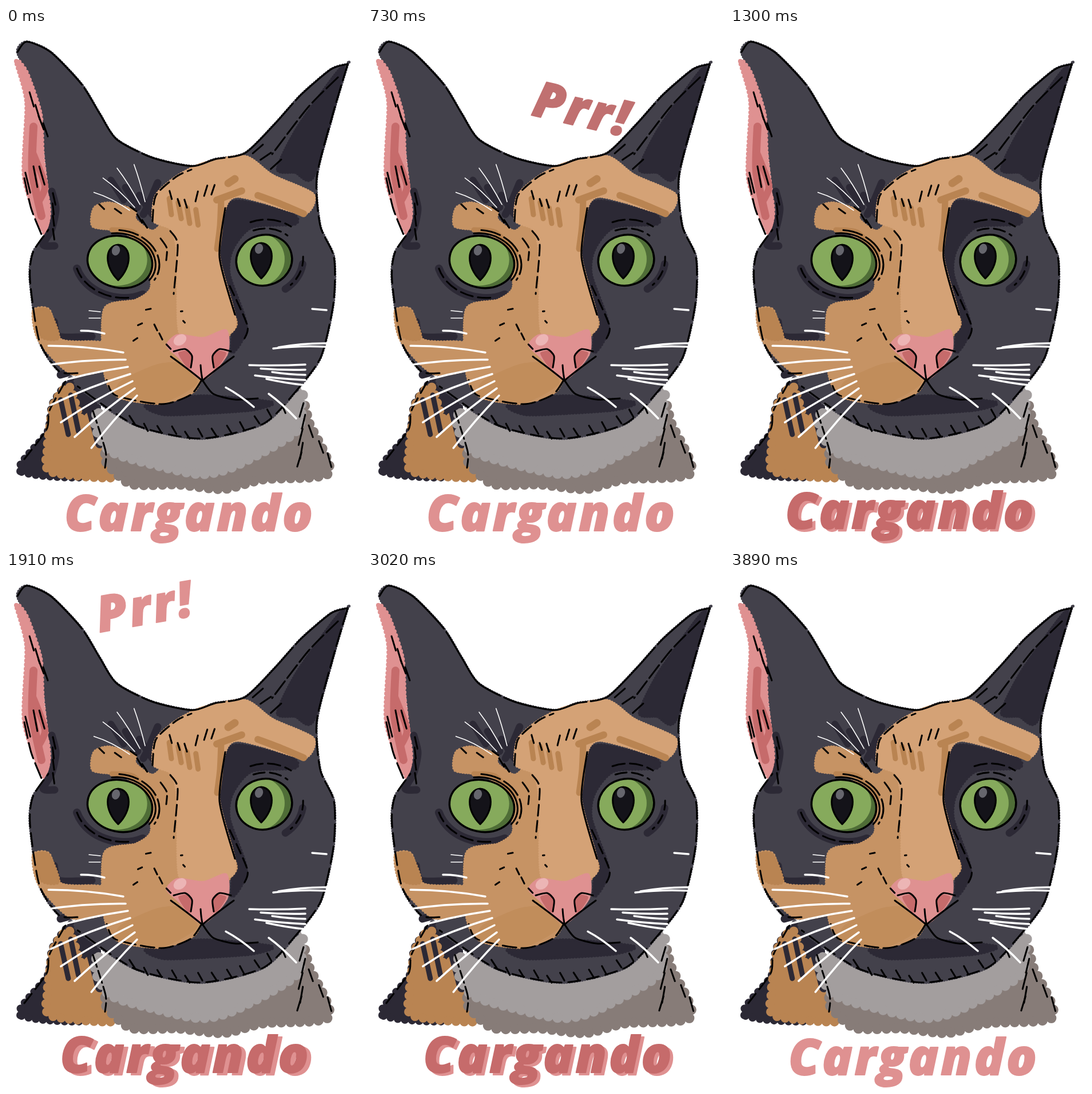
These frames come from a looping animation (622 by 900 pixels, 4120 ms). An HTML page with a canvas:

```html
<!DOCTYPE html>
<html lang="es">
<head>
<meta charset="utf-8">
<title>Cargando</title>
<style>
html, body { margin: 0; width: 100%; height: 100%; overflow: hidden; background: #fff; }
canvas { display: block; width: 622px; height: 900px; }
</style>
</head>
<body>
<canvas id="stage" width="622" height="900"></canvas>
<script>
const W = 622, H = 900, LOOP = 4120;
const FUR = '#43414b', NAVY = '#2c2935', INK = '#000', WHITE = '#fff';
const TAN = '#d4a276', AMBER = '#c69364', BROWN = '#b98452';
const PINK = '#df9191', ROSE = '#c66b6b', DUSK = '#c07070';
const GREY = '#a39e9e', TAUPE = '#877c78';

// Key points of the head, shared by its fill and its ink
const CROWN = '20,42 36,24 78,42 132,98 164,150 193,194 255,226 325,241 365,229 418,218 470,167 516,116 568,72 597,63';
const SIDE = '597,63 571,150 543,260 549,345 573,400 572,480 550,574 508,632';
const CHIN = '508,632 450,690 340,716 225,692 125,625';
const CHEEK = '125,602 92,598 58,545 42,440 47,392 74,352';

const stage = document.getElementById('stage').getContext('2d');
const art = document.createElement('canvas');
art.width = W;
art.height = H;
const g = art.getContext('2d');
g.lineCap = g.lineJoin = 'round';

let seed = 7;
function jitter(size) {
  seed = seed * 16807 % 2147483647;
  return (seed / 2147483647 - 0.5) * size;
}

// Smooth curve through the points of "x,y x,y ..."
function curve(text, closed) {
  const p = text.split(' ').map(s => s.split(',').map(Number));
  const n = p.length;
  const at = i => closed ? p[(i + n) % n] : p[Math.max(0, Math.min(n - 1, i))];
  const path = new Path2D();
  path.moveTo(...p[0]);
  for (let i = 0; i < (closed ? n : n - 1); i++) {
    const [a, b, c, d] = [at(i - 1), at(i), at(i + 1), at(i + 2)];
    path.bezierCurveTo(
      b[0] + (c[0] - a[0]) / 8, b[1] + (c[1] - a[1]) / 8,
      c[0] - (d[0] - b[0]) / 8, c[1] - (d[1] - b[1]) / 8, c[0], c[1]);
  }
  return path;
}

function trace(color, width, path, dash = []) {
  g.strokeStyle = color;
  g.lineWidth = width;
  g.setLineDash(dash);
  g.stroke(path);
  g.setLineDash([]);
}

const line = (color, width, text, dash) => trace(color, width, curve(text), dash);

// Filled curve; fuzz is the size of the brush dabs around its edge
function shape(color, text, fuzz = 0) {
  const path = curve(text, true);
  g.fillStyle = color;
  g.fill(path);
  if (fuzz) trace(color, fuzz, path, [0, fuzz * 0.9]);
}

function oval(color, x, y, rx, ry, turn = 0) {
  g.fillStyle = color;
  g.beginPath();
  g.ellipse(x, y, rx, ry, turn, 0, 7);
  g.fill();
}

// Row of n short strokes, spread from one point to another
function hairs(n, x0, y0, x1, y1, dx, dy, color = INK, width = 3) {
  for (let i = 0; i < n; i++) {
    const k = n > 1 ? i / (n - 1) : 0;
    const x = x0 + (x1 - x0) * k + jitter(5), y = y0 + (y1 - y0) * k + jitter(8);
    const path = new Path2D();
    path.moveTo(x, y);
    path.lineTo(x + dx + jitter(3), y + dy + jitter(5));
    trace(color, width, path);
  }
}

function whisker(x0, y0, x1, y1, bend = 0, width = 3.5) {
  const path = new Path2D();
  path.moveTo(x0, y0);
  path.quadraticCurveTo((x0 + x1) / 2, (y0 + y1) / 2 + bend, x1, y1);
  trace(WHITE, width, path);
}

// Arc around an eye, from angle a to b in degrees
function ring(color, width, eye, scale, a, b, dash) {
  const path = new Path2D(), rad = Math.PI / 180;
  path.ellipse(eye.x, eye.y, eye.rx * scale, eye.ry * scale, eye.turn, a * rad, b * rad);
  trace(color, width, path, dash);
}

const leftEye = { x: 199, y: 408, rx: 57, ry: 45, turn: 0.2, shade: -9, drop: -7, pupil: -3 };
const rightEye = { x: 451, y: 405, rx: 49, ry: 44, turn: -0.25, shade: -13, drop: -1, pupil: -5 };

function drawEye(eye) {
  const { x, y, rx, ry, turn } = eye;
  oval('#4f6d37', x, y, rx, ry, turn);
  g.save();
  g.clip();
  oval('#86aa5c', x + eye.shade, y + eye.drop, rx, ry + 3, turn);
  g.restore();
  ring(INK, 3.5, eye, 1, 0, 360);
  const px = x + eye.pupil;
  const pupil = new Path2D();
  pupil.moveTo(px, y - 30);
  pupil.bezierCurveTo(px + 24, y - 28, px + 25, y + 8, px, y + 32);
  pupil.bezierCurveTo(px - 25, y + 8, px - 24, y - 28, px, y - 30);
  g.fillStyle = '#141319';
  g.fill(pupil);
  trace(INK, 3, pupil);
  oval('#66666d', px - 4, y - 20, 7, 9, 0.3);
}

function drawBody() {
  shape(NAVY, '25,773 72,705 82,654 118,612 152,640 174,775', 14);
  shape(BROWN, '84,655 110,625 130,680 150,682 166,750 190,784 78,774 72,735 76,700', 16);
  hairs(2, 98, 645, 112, 640, 14, 62, NAVY, 9);
  line(NAVY, 16, '134,625 148,665 164,725');
  shape(TAUPE, '175,742 350,765 480,700 518,655 530,690 564,776 450,787 380,804 300,796 215,794', 18);
  shape(GREY, '162,672 330,690 505,635 516,650 505,705 400,764 340,778 260,762 178,735', 18);
}

function drawHead() {
  shape(FUR, [CROWN, SIDE, CHIN, CHEEK, '76,300 66,200 45,95'].join(' '), 5);
  shape(PINK, '18,58 36,78 60,150 64,225 75,320 66,356 32,262 36,130', 8);
  line(ROSE, 14, '48,172 46,250 62,328');
  line(ROSE, 12, '46,215 68,275 56,305');
  line(NAVY, 13, '80,285 87,315 80,350 65,378 85,380');
  shape(NAVY, '474,246 508,175 580,75 588,84 538,258 505,252', 5);
  hairs(3, 182, 265, 232, 295, 22, 34, NAVY, 12);
  line(NAVY, 13, '265,270 248,310 240,325');
  line(NAVY, 13, '84,512 93,538 150,538');
  line(NAVY, 13, '95,605 150,590');
  ring(NAVY, 14, leftEye, 1.38, 50, 155);
  ring(NAVY, 13, rightEye, 1.4, 22, 70);
  shape(NAVY, '383,318 410,302 500,325 504,342 430,347 396,385 390,430 420,520 395,566 396,496 374,410', 6);
  shape(NAVY, '245,658 340,642 464,653 430,666 345,672 275,674', 6);
}

function drawPatches() {
  shape(AMBER, '48,494 75,492 96,544 170,550 190,588 116,603 58,545', 6);
  shape(BROWN, '50,495 74,493 92,540 62,538', 6);
  shape(AMBER, '152,346 154,314 180,305 224,318 226,334 256,354 300,340 398,500 390,535 342,612 325,636 270,655 196,643 172,600 172,490 228,474 254,450 238,380 200,354', 5);
  shape('#c18d5b', '200,616 262,587 306,585 334,620 270,655 196,643');
  shape(TAN, '258,336 262,292 298,259 345,236 418,224 466,257 537,290 522,324 450,304 402,294 383,314 372,396 399,500 394,530 345,540 303,530 300,400 290,352', 5);
  hairs(4, 283, 295, 330, 318, 5, 28, BROWN, 9);
  line(BROWN, 11, '376,298 374,345 369,385');
  line(BROWN, 12, '368,300 412,284');
  line(BROWN, 13, '388,271 400,263');
  line(BROWN, 12, '440,292 480,307 520,324');
  line(BROWN, 9, '185,352 222,356 258,392');
}

function drawNose() {
  shape(PINK, '281,553 300,535 345,540 385,527 386,570 343,613 300,573', 3);
  for (const side of [-1, 1]) {
    const x = dx => 343 + side * dx;
    shape(ROSE, `${x(42)},567 ${x(26)},563 ${x(18)},576 ${x(20)},594 ${x(30)},588`);
    line(INK, 3, `${x(50)},564 ${x(30)},560 ${x(18)},572 ${x(20)},592`);
    line(INK, 3, `${x(55)},573 ${x(24)},596 343,615`);
  }
  oval('#ecb5b5', 304, 544, 12, 9, -0.6);
  line(INK, 3, '340,588 341,600 343,613');
  line(INK, 3, '342,614 322,640 272,656 192,641 176,614', [24, 9]);
  line(INK, 3, '343,614 362,638 400,648 440,646');
}

function drawInk() {
  // Head and neck
  line(INK, 3, CROWN, [150, 7]);
  line(INK, 3, SIDE, [30, 9]);
  line(INK, 3, CHIN, [21, 12]);
  line(INK, 3, CHEEK, [23, 10]);
  line(INK, 3, '104,616 76,667 71,700 32,752', [24, 10]);
  line(INK, 3, '152,668 174,738 173,767', [22, 7]);
  for (let x = 222; x < 490; x += 24) {
    const y = 715 - (x - 330) ** 2 / 507;
    hairs(1, x - 6, y - 14, 0, 0, 8, 14);
  }
  hairs(5, 522, 655, 515, 742, -6, 26);
  hairs(3, 531, 697, 560, 744, 7, 22);
  // Ears
  hairs(4, 43, 112, 66, 168, 9, 23);
  hairs(3, 36, 250, 60, 240, 8, 34);
  line(INK, 3, '32,262 44,315 62,360', [28, 9]);
  hairs(4, 80, 285, 80, 350, 3, 18);
  line(INK, 3, '580,86 528,138 465,220', [28, 7]);
  hairs(3, 430, 220, 462, 243, 17, -15);
  // Forehead and bridge
  line(INK, 3, '256,337 262,292 298,259 324,247', [20, 9]);
  hairs(3, 285, 287, 312, 302, 4, 14);
  hairs(3, 335, 285, 366, 272, -5, 18);
  line(INK, 3, '270,367 281,384 280,405', [19, 8]);
  line(INK, 3, '287,354 300,378 293,464', [19, 9]);
  line(INK, 3, '383,314 373,400 400,500');
  line(INK, 3, '391,450 422,520 413,548', [18, 9]);
  // Around the eyes
  ring(INK, 3, leftEye, 1.1, -112, 25);
  ring(INK, 3, leftEye, 1.22, -100, 20, [34, 8]);
  ring(INK, 3, leftEye, 1.38, 70, 155, [22, 9]);
  ring(INK, 3, rightEye, 1.4, 10, 60, [16, 10]);
  ring(INK, 3, rightEye, 1.25, -95, -35, [20, 9]);
  ring(INK, 3, rightEye, 1.6, -95, -40, [22, 9]);
  hairs(3, 162, 308, 215, 316, 10, 7);
  hairs(2, 228, 322, 240, 338, 10, 16);
  // Freckles
  hairs(3, 222, 542, 242, 492, 8, -3);
  hairs(2, 306, 495, 308, 507, 4, 1);
  hairs(3, 259, 520, 280, 552, 6, 10);
}

function drawWhiskers() {
  for (let i = 0; i < 7; i++) {
    const a = (198 - 13.6 * i) * Math.PI / 180;
    whisker(205 + 4 * i, 566 + 12.5 * i, 215 + 148 * Math.cos(a), 600 + 148 * Math.sin(a), -6);
  }
  for (let i = 0; i < 4; i++) {
    const a = (200 + 23 * i) * Math.PI / 180;
    whisker(216 + 9 * i, 318 - 5 * i, 225 + 76 * Math.cos(a), 312 + 74 * Math.sin(a), -6, 1.6);
  }
  for (let i = 0; i < 5; i++) whisker(425 + i * 2 % 5 * 10, 588 + 6 * i, 523, 587 + 9 * i, 2);
  for (let i = 0; i < 2; i++) {
    whisker(476 - 9 * i, 557 + 2 * i, 560, 550 + 6 * i, -4);
    whisker(384 + 75 * i, 627 + 11 * i, 433 + 74 * i, 661 + 20 * i, -4);
    whisker(145, 493 + 13 * i, 165, 495 + 11 * i, 0, 1.6);
  }
  whisker(131, 528, 172, 533, -3);
  whisker(535, 490, 560, 492);
}

function word(text, x, y, color, angle = 0) {
  stage.save();
  stage.translate(x, y);
  stage.rotate(angle * Math.PI / 180);
  stage.font = 'italic 800 87px "Open Sans", sans-serif';
  stage.letterSpacing = '4px';
  stage.textAlign = 'center';
  stage.lineJoin = 'round';
  stage.lineWidth = 2;
  stage.fillStyle = stage.strokeStyle = color;
  stage.fillText(text, 0, 30);
  stage.strokeText(text, 0, 30);
  stage.restore();
}

// Each entry: start, end, then where it sits
const pulses = [[470, 730, 0], [1100, 1370, 1], [1910, 2180, -1], [3020, 3420, 1]];
const purrs = [
  [270, 700, 245, 53, PINK, -10], [700, 1200, 375, 142, DUSK, 13],
  [1640, 2080, 243, 61, PINK, -10], [2130, 2550, 374, 139, DUSK, 13],
  [3220, 3890, 315, 100, PINK, -10]
];

function frame(now) {
  const t = now % LOOP;
  const live = ([start, end]) => t >= start && t < end;
  stage.fillStyle = WHITE;
  stage.fillRect(0, 0, W, H);
  stage.drawImage(art, 0, 0);
  word('Cargando', 321, 847, PINK);
  for (const [, , dx] of pulses.filter(live)) word('Cargando', 314.5 + dx, 843, ROSE);
  for (const [, , ...place] of purrs.filter(live)) word('Prr!', ...place);
}

drawBody();
drawHead();
drawPatches();
drawEye(leftEye);
drawEye(rightEye);
drawNose();
drawInk();
drawWhiskers();

const begin = performance.now();
function tick() {
  frame(performance.now() - begin);
  requestAnimationFrame(tick);
}
tick();
</script>
</body>
</html>
```
